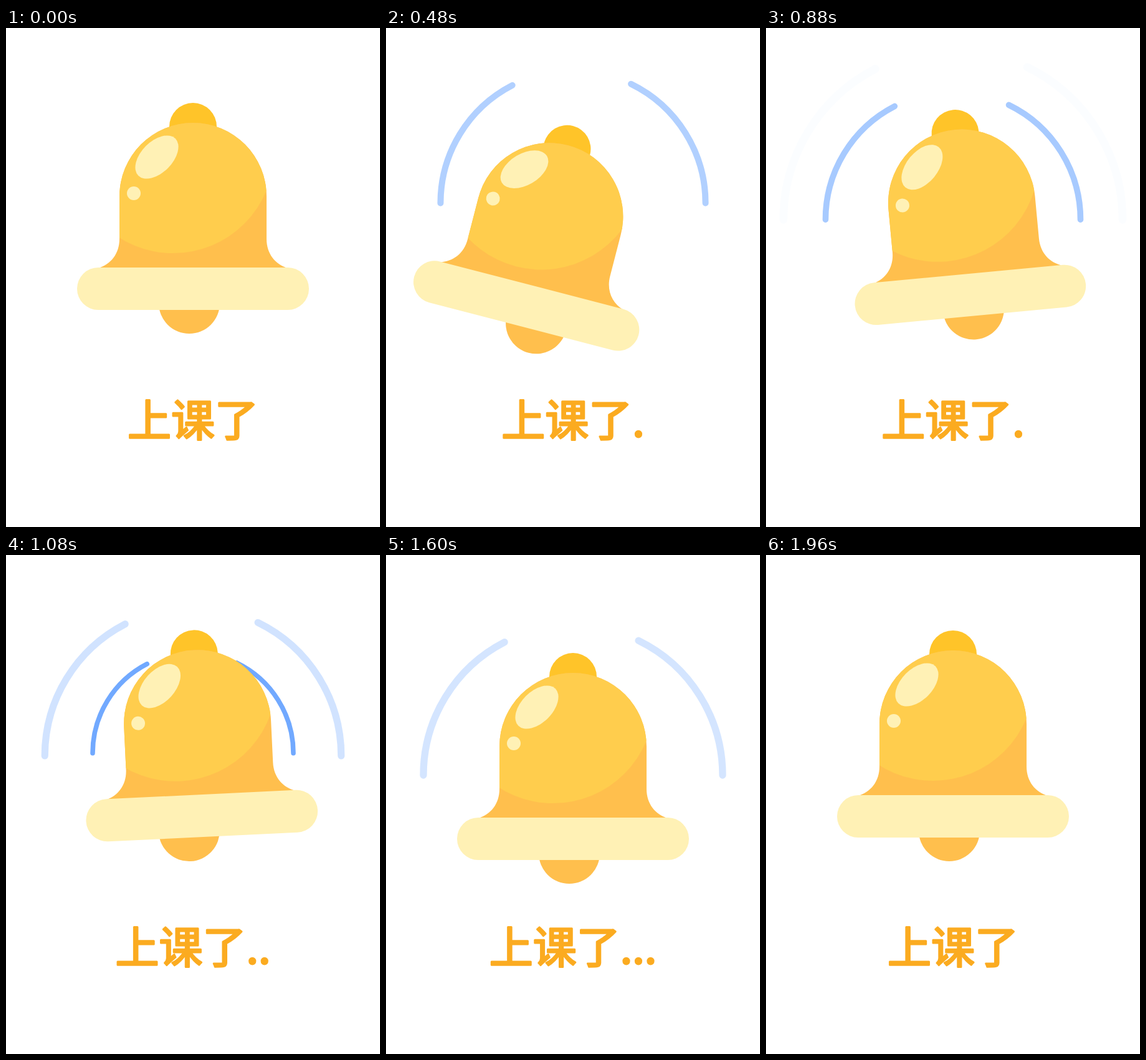
An HTML page for the animation above (2000 ms loop, 600 by 800 pixels).

```html
<!DOCTYPE html>
<html lang="zh-CN">
<head>
<meta charset="utf-8">
<style>
html, body { margin: 0; width: 100%; height: 100%; overflow: hidden; background: #fff; }
svg { display: block; width: 100%; height: 100%; }
text {
  font: 400 70px "Noto Sans CJK SC", "Noto Sans CJK", sans-serif;
  text-anchor: middle; fill: #fbab20; stroke: #fbab20;
  stroke-width: 3; stroke-linejoin: round;
}
.wave { fill: none; stroke: #6aa5ff; stroke-width: .047; stroke-linecap: round; }
</style>
</head>
<body>
<svg viewBox="0 0 600 800">
  <defs>
    <path id="body" d="M182 270A118 118 0 0 1 418 270V338C418 362 432 379 452 385H148C168 379 182 362 182 338Z"/>
    <clipPath id="inside"><use href="#body"/></clipPath>
    <path id="arcs" d="M-1 0A1 1 0 0 1 -.458 -.889M.438 -.899A1 1 0 0 1 1 0"/>
  </defs>
  <use class="wave" href="#arcs"/>
  <use class="wave" href="#arcs"/>
  <use class="wave" href="#arcs"/>
  <g id="bell">
    <circle id="clapper" cx="294" cy="441" r="49" fill="#ffbf4d"/>
    <circle cx="300" cy="158" r="38" fill="#ffc429"/>
    <use href="#body" fill="#ffbf4d"/>
    <circle cx="268" cy="199" r="162" fill="#ffcd4d" clip-path="url(#inside)"/>
    <g fill="#fff1b5">
      <ellipse rx="42" ry="25" transform="translate(242 207) rotate(-45)"/>
      <circle cx="205" cy="265" r="11"/>
      <rect x="114" y="384" width="372" height="68" rx="34"/>
    </g>
  </g>
  <text id="label" x="300" y="655"></text>
</svg>
<script>
const LOOP = 2000, STEP = 40;
const $ = id => document.getElementById(id);
const waves = document.querySelectorAll('.wave');

// Keys are [time in ms, value].
const bob = [[0, 0], [430, 37], [595, 37], [1048, 0], [1530, 37], [1615, 37], [2000, 0]];
const swing = [[0, 0], [150, -15], [325, 15], [470, -15], [590, 12], [740, -12], [840, 8],
  [980, -6], [1110, 4], [1240, -2], [1340, 0]];
const slide = [[0, 0], [90, 50], [275, -59], [430, 55], [575, -45], [700, 45], [800, -25],
  [930, 25], [1060, -18], [1170, 13], [1285, -9], [1400, 0]];
const rings = [
  { y: 186, keys: [[130, 155], [280, 177], [640, 241], [880, 272], [900, 274]] },
  { y: 216, keys: [[520, 155], [640, 171], [880, 204.5], [1280, 271], [1300, 274]] },
  { y: 246, keys: [[1040, 155], [1280, 191], [1600, 240], [1800, 270]] }
];

const linear = u => u;
const sine = u => (1 - Math.cos(Math.PI * u)) / 2;

function valueAt(keys, t, ease) {
  const i = keys.findIndex(k => k[0] > t);
  if (i < 0) return keys[keys.length - 1][1];
  if (i === 0) return keys[0][1];
  const [t0, a] = keys[i - 1], [t1, b] = keys[i];
  return a + (b - a) * ease((t - t0) / (t1 - t0));
}

function drawWave(el, { y, keys }, t) {
  const alive = t >= keys[0][0] && t < keys[keys.length - 1][0];
  const r = valueAt(keys, t, linear);
  el.setAttribute('opacity', alive ? Math.min(1, (275 - r) / 120) : 0);
  el.setAttribute('transform', `translate(300 ${y + 0.446 * r}) scale(${r})`);
}

function draw(now) {
  const t = Math.floor(now % LOOP / STEP) * STEP;
  waves.forEach((el, i) => drawWave(el, rings[i], t));
  // A positive swing carries the bell's rim to the right.
  $('bell').setAttribute('transform',
    `translate(0 ${valueAt(bob, t, sine)}) rotate(${-valueAt(swing, t, sine)} 300 120)`);
  $('clapper').setAttribute('cx', 294 + valueAt(slide, t, sine));
  const words = '上课了' + '.'.repeat(Math.floor(t / 480) % 4);
  if ($('label').textContent !== words) $('label').textContent = words;
}

const start = performance.now();
function tick() {
  draw(performance.now() - start);
  requestAnimationFrame(tick);
}
tick();
</script>
</body>
</html>
```
